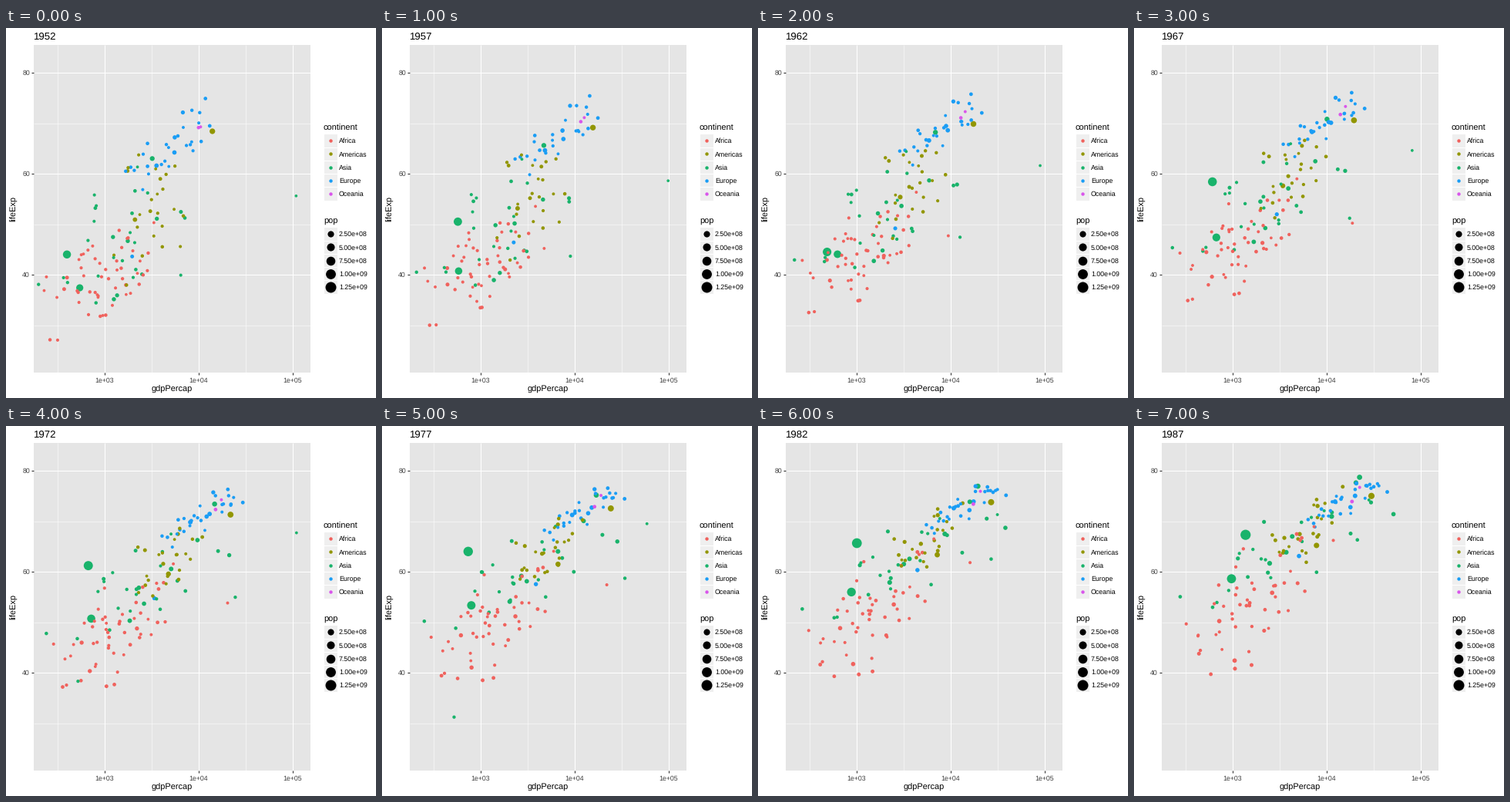
These frames come from a looping animation (480x480 px, 8000 ms). A matplotlib script:

```python
import numpy as np
import matplotlib.pyplot as plt
from matplotlib.animation import FuncAnimation
from matplotlib.patches import Rectangle

plt.rcParams["font.family"] = "Liberation Sans"
plt.rcParams["text.hinting"] = "none"

SIZE, DPI = 480, 72
YEARS = np.arange(1952, 1988, 5)
T = np.linspace(0, 1, len(YEARS))
LEFT, RIGHT, TOP, BOTTOM = 36, 395, 22, 447
MAX_POP = 1318.7  # millions

COLORS = {"Africa": "#f0625d", "Americas": "#929600", "Asia": "#19b36b",
          "Europe": "#1a9df5", "Oceania": "#d956eb"}

rng = np.random.default_rng(11)


def px(log_gdp):
    return 127.7 + 122.2 * (log_gdp - 3)


def py(age):
    return 58 + 6.55 * (80 - age)


def area(pop):
    size = 1 + 5 * np.sqrt(pop / MAX_POP)
    return (0.75 * (2.845 * size + 0.945) + 0.7) ** 2


def spread(n):
    """Bell-shaped scores without far outliers, mean 0 and deviation 1."""
    z = np.clip(rng.normal(size=n), -2, 1.7)
    return (z - z.mean()) / z.std()


def linked(z, r):
    """New scores that correlate with z by about r."""
    return r * z + np.sqrt(1 - r * r) * spread(len(z))


def blend(a, b, ease):
    return a[:, None] + np.outer(b - a, T ** ease)


def cloud(name, n, gdp, age, link, ease, pop, growth):
    """Scatter n dots; gdp and age hold (mean, deviation) at start and end."""
    (g0, gs0), (g1, gs1) = gdp
    (a0, as0), (a1, as1) = age
    rich0 = spread(n)
    rich1 = linked(rich0, .88)
    health0 = linked(rich0, link[0])
    health1 = .35 * health0 + .75 * linked(rich1, link[1])
    x = blend(g0 + gs0 * rich0, g1 + gs1 * rich1, ease)
    y = blend(a0 + as0 * health0, a1 + as1 * health1, ease)
    base = np.clip(pop * np.exp(spread(n)), .2, 80)
    return x, y, np.outer(base, growth ** T), [COLORS[name]] * n


def tour(name, pop, growth, *keys):
    """One dot that passes through key points (year, income, life)."""
    year, gdp, age = np.transpose(keys)
    x = np.interp(YEARS, year, np.log10(gdp))
    y = np.interp(YEARS, year, age)
    return x[None], y[None], pop * growth ** T[None], [COLORS[name]]


groups = [
    cloud("Africa", 51, [(2.97, .29), (3.18, .34)], [(39.2, 4.8), (53.2, 7.5)],
          (.25, .6), .9, 3.5, 2.45),
    cloud("Americas", 23, [(3.51, .19), (3.77, .22)], [(53, 8.6), (68, 5.2)],
          (.5, .6), .9, 4.5, 2.2),
    cloud("Asia", 27, [(3.16, .33), (3.58, .5)], [(46.6, 8), (65, 7.2)],
          (.5, .8), 1, 9, 2.05),
    cloud("Europe", 29, [(3.71, .25), (4.21, .21)], [(65.4, 4.7), (74, 2.5)],
          (.82, .75), .72, 8, 1.2),
    cloud("Oceania", 2, [(4.01, .011), (4.31, .03)], [(69.2, .15), (75.3, 1)],
          (.9, .9), .72, 4, 1.8),
    tour("Asia", 556, 1.95, (1952, 400, 44), (1957, 576, 50.5),
         (1962, 488, 44.5), (1967, 613, 58.4), (1977, 741, 64),
         (1987, 1379, 67.3)),
    tour("Asia", 372, 2.12, (1952, 547, 37.4), (1972, 724, 50.7),
         (1987, 977, 58.6)),
    tour("Asia", 86, 1.41, (1952, 3217, 63), (1972, 14779, 73.4),
         (1987, 22376, 78.7)),
    tour("Asia", .2, 9, (1952, 108382, 55.6), (1967, 80895, 64.6),
         (1972, 109348, 67.7), (1982, 31354, 71.3), (1987, 28118, 74.2)),
    tour("Asia", 4.7, 1.8, (1952, 368, 39.4), (1967, 523, 45.4),
         (1977, 525, 31.2), (1982, 624, 51), (1987, 684, 53.9)),
    tour("Asia", 4, 3.6, (1952, 6460, 39.9), (1977, 34168, 58.7),
         (1987, 21198, 66.3)),
    tour("Africa", 1, 3.7, (1952, 2388, 42.7), (1967, 18773, 50.2),
         (1977, 21951, 57.4), (1987, 11770, 66.2)),
    tour("Americas", 158, 1.54, (1952, 13990, 68.4), (1972, 21806, 71.3),
         (1987, 29884, 75)),
    tour("Americas", 57, 2.5, (1952, 2109, 50.9), (1967, 3430, 57.6),
         (1977, 6660, 61.5), (1987, 7807, 65.2)),
    tour("Europe", 22, 2.4, (1952, 1969, 43.6), (1987, 5089, 63.1)),
]
GDP, AGE, POP = (np.vstack([g[k] for g in groups]) for k in range(3))
TINTS = np.concatenate([g[3] for g in groups])
order = np.argsort(-POP[:, 0], kind="stable")  # large dots lie underneath
GDP, AGE, POP, TINTS = GDP[order], AGE[order], POP[order], TINTS[order]

fig = plt.figure(figsize=(SIZE / DPI, SIZE / DPI), dpi=DPI, facecolor="white")
ax = fig.add_axes([0, 0, 1, 1])
ax.set_xlim(0, SIZE)
ax.set_ylim(SIZE, 0)
ax.axis("off")


def box(x, y, w, h, color, **kw):
    ax.add_patch(Rectangle((x, y), w, h, fc=color, **{"lw": 0, **kw}))


def line(x0, y0, x1, y1, color, width):
    ax.plot([x0, x1], [y0, y1], color=color, lw=width,
            solid_capstyle="butt", zorder=2)


def label(x, y, text, size=8.8, color="black", **kw):
    return ax.text(x, y, text, fontsize=size, color=color,
                   **{"va": "baseline", **kw})


box(LEFT, TOP, RIGHT - LEFT, BOTTOM - TOP, "#e5e5e5")
for v in (2.5, 3.5, 4.5):
    line(px(v), TOP, px(v), BOTTOM, "white", .53)
for v in (30, 50, 70):
    line(LEFT, py(v), RIGHT, py(v), "white", .53)
for v in (3, 4, 5):
    line(px(v), TOP, px(v), BOTTOM, "white", 1.07)
    line(px(v), BOTTOM, px(v), BOTTOM + 3, "#2b2b2b", 1.07)
    label(px(v), 460, f"1e+0{v}", color="#404040", ha="center")
for v in (40, 60, 80):
    line(LEFT, py(v), RIGHT, py(v), "white", 1.07)
    line(LEFT - 3, py(v), LEFT, py(v), "#2b2b2b", 1.07)
    label(31, py(v) + 3.2, str(v), color="#404040", ha="right")

label(215.5, 472, "gdpPercap", 11, ha="center")
label(15, 234.5, "lifeExp", 11, rotation=90, ha="right", va="center")


def legend(title, title_y, first_y, entries):
    label(412, title_y, title, 11)
    for i, (text, color, s) in enumerate(entries):
        y = first_y + 17.28 * i
        box(412.4, y - 8.64, 17.28, 17.28, "#efefef", ec="white", lw=1.07)
        ax.scatter([421], [y], s=s, c=color, linewidths=0, zorder=4)
        label(432, y + 3.2, text)


legend("continent", 133, 146,
       [(name, color, area(9)) for name, color in COLORS.items()])
legend("pop", 254, 267,
       [(f"{p * 1e6:.2e}", "black", area(p)) for p in range(250, 1251, 250)])

title = label(36, 15, "", 13.2)
dots = ax.scatter(px(GDP[:, 0]), py(AGE[:, 0]), s=area(POP[:, 0]),
                  c=TINTS, linewidths=0, zorder=3)


def draw(i):
    title.set_text(str(YEARS[i]))
    dots.set_offsets(np.column_stack([px(GDP[:, i]), py(AGE[:, i])]))
    dots.set_sizes(area(POP[:, i]))
    return title, dots


anim = FuncAnimation(fig, draw, frames=len(YEARS), interval=1000,
                     repeat=True, repeat_delay=0)
plt.show()
```
